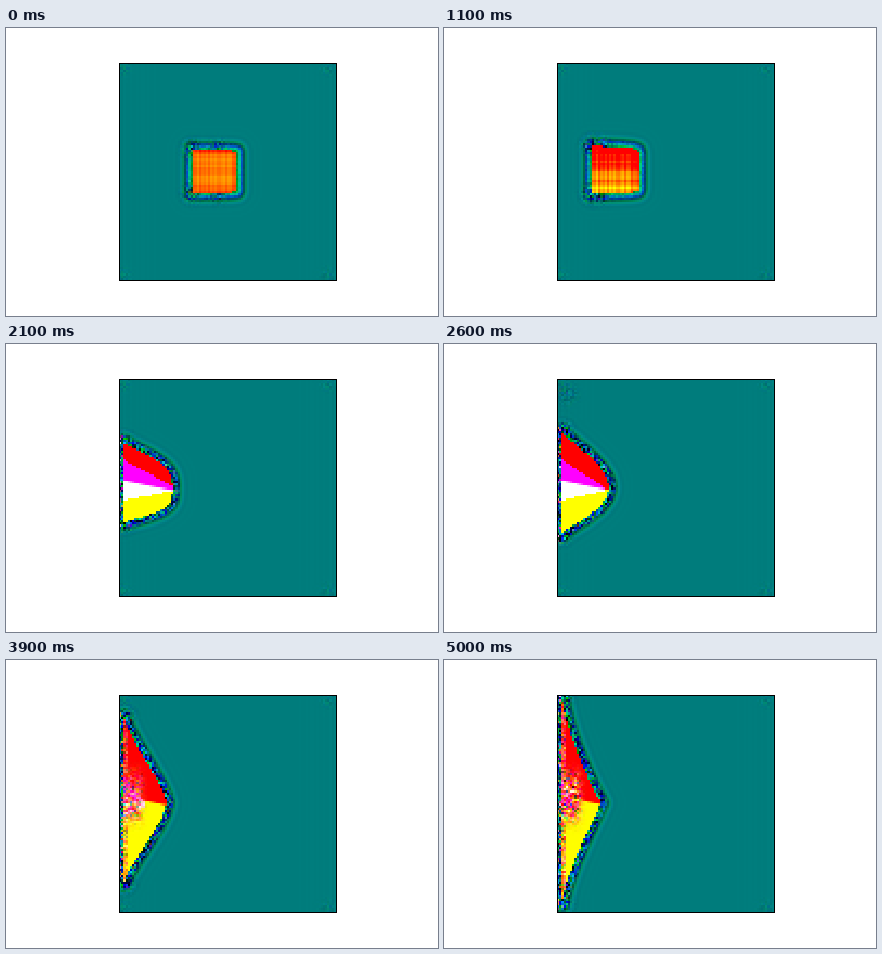
Write a matplotlib script that moves like this. It is 432x288 px and loops after 5.1 s.

```python
import numpy as np
import matplotlib.pyplot as plt
from matplotlib.animation import FuncAnimation
from matplotlib.path import Path

W, H, DPI = 432, 288, 72
FRAMES, STEP = 51, 100
N = 100                         # cells per side
X0, Y0, SIDE = 113, 35, 217     # field box, y downwards
WALL, TIP_Y = 118, 143
TAU = 2 * np.pi

centres = (np.arange(N) + 0.5) * SIDE / N
X, Y = np.meshgrid(X0 + centres, Y0 + centres)
CELLS = np.column_stack([X.ravel(), Y.ravel()])


def smooth(t, start, end):
    s = np.clip((t - start) / (end - start), 0, 1)
    return s * s * (3 - 2 * s)


def ramp(t, start):
    """Zero before start, then rising by one a second, with a soft knee."""
    return np.log1p(np.exp(4 * (t - start))) / 4


def spot(x, y, r):
    return np.exp(-((X - x) ** 2 + (Y - y) ** 2) / r ** 2)


def power(t):
    """Exponent of the right edge: boxy at first, a plain wedge at the end."""
    return 2.7 - 0.35 * t + 60 * np.exp(-t * t)


def outline(t):
    """The blob drifts left, hits the wall and spreads along it."""
    left = max(WALL, 186 - 35 * t)
    right = max(231 - 33 * t, 173 - 3.2 * t)
    top = max(122 - 23 * ramp(t, 1.1), 38)
    bottom = min(165 + 25 * ramp(t, 1.6), 243)

    v = np.sin(np.linspace(-np.pi / 2, np.pi / 2, 35))
    p = np.where(v < 0, power(t), power(max(t - 0.25, 0)))
    xs = left + (right - left) * (1 - np.abs(v) ** p) ** 1.35
    ys = TIP_Y + v * np.where(v < 0, TIP_Y - top, bottom - TIP_Y)
    corners = np.array([(x, y) for x in (left, xs[2]) for y in (top, bottom)])
    return np.column_stack([xs, ys]), corners


def distance(poly):
    """Distance of each cell to the outline, and the inside mask."""
    best = np.full(len(CELLS), np.inf)
    for a, b in zip(poly, np.roll(poly, -1, axis=0)):
        ab = b - a
        s = np.clip((CELLS - a) @ ab / max(ab @ ab, 1e-9), 0, 1)
        gap = CELLS - a - s[:, None] * ab
        best = np.minimum(best, (gap ** 2).sum(axis=1))
    inside = Path(poly).contains_points(CELLS)
    return np.sqrt(best).reshape(N, N), inside.reshape(N, N)


def background():
    rng = np.random.default_rng(9)
    img = np.zeros((N, N, 3))
    img[..., 1:] = 0.49
    near = sum(spot(x, y, 7) for x in (117, 322) for y in (40, 247))
    img[..., 1:] += 0.07 * near[..., None] * rng.uniform(-1, 1, (N, N, 2))
    rim = np.minimum(X - X0, X0 + SIDE - X)
    img[..., 1:] += (0.015 * np.exp(-rim / 9) * np.cos(TAU * rim / 6))[..., None]
    return img


BACK = background()
LINES = np.random.default_rng(4).uniform(-1, 1, (2, N))


def grid_lines(left, top, t):
    """Fine lines that travel with the blob."""
    cols = ((X - left) * N / SIDE).astype(int) % N
    rows = ((Y - top) * N / SIDE).astype(int) % N
    fade = 0.1 + 0.12 * smooth(t, 0, 1) - 0.22 * smooth(t, 1.5, 2.1)
    return fade * (LINES[0][cols] + LINES[1][rows])


def ring(img, d, corners, t, rng):
    rough = np.max([spot(x, y, 8) for x, y in corners], axis=0)
    clump = spot(123, 50, 9) * np.exp(-((t - 3.1) / 0.4) ** 2)
    near = np.exp(-(d / 9) ** 3)
    mix = (0.1 + 0.8 * smooth(t, 0.8, 2.6)) * np.exp(-(d / 6.5) ** 4)
    mix = np.clip(mix + 0.6 * rough + clump, 0, 1)
    r, g, b = rng.uniform(-1, 1, (3, N, N))

    wave = (1 - mix) * near * 0.36
    halo = 0.05 * np.exp(-(d / 12) ** 2) * np.cos(TAU * d / 6)
    img[..., 1] += wave * np.cos(TAU * (d - 2) / 8) + mix * (0.6 * g - 0.2) + halo
    img[..., 2] += wave * np.cos(TAU * (d - 4) / 8) + mix * (0.6 * b - 0.05) + halo / 2
    img[..., 0] += mix * np.where(X < WALL, r > 0.6, 0.4 * (r > 0.9))


def fill(d, left, top, t, rng):
    spread = smooth(t, 1.5, 2.1)
    line = 147 - 5 * spread + 0.2 * smooth(t, 0.5, 1.5) * (X - 145)
    green = 0.47 + (0.022 * min(t, 1.5) + 0.5 * spread) * (Y - line)
    green += grid_lines(left, top, t)
    green -= 0.4 * (1 - spread) * np.exp(-d / 2)

    # counterflow wedge: blue channel switched on next to the wall
    tip = np.interp(t, [1.5, 2.1, 5], [113, 168, 122])
    s = (X - WALL) / max(tip - WALL, 1)
    wedge = (s < 1) & (Y > 116 + 27 * s) & (Y < 156 - 9 * s) & (tip > WALL)

    r, g, b = rng.uniform(-1, 1, (3, N, N))
    g = (g + np.roll(g, 1, 1)) * 0.7
    core = np.exp(-((X - 124) / 13) ** 4 - ((Y - 137) / 25) ** 4)
    zone = smooth(t, 2.9, 4.4) * np.maximum(core, 0.6 * (X < 121))
    green = np.clip(green, 0, 1) * (1 - zone) + zone * (0.4 + 0.6 * g)
    blue = wedge * (1 - zone) + zone * (0.35 + 0.6 * b)
    red = 1 - zone * 0.8 * (r > 0.75)
    return np.stack([red, green, blue], axis=-1)


def field(i):
    t = i * STEP / 1000
    rng = np.random.default_rng(100 + i)
    edge, corners = outline(t)
    left, top = corners[0]
    d, inside = distance(np.vstack([corners[0], edge, corners[1]]))
    img = BACK.copy()
    ring(img, d, corners, t, rng)
    img[inside] = fill(d, left, top, t, rng)[inside]
    return np.clip(img, 0, 1)


fig = plt.figure(figsize=(W / DPI, H / DPI), dpi=DPI, facecolor="white")
ax = fig.add_axes([X0 / W, 1 - (Y0 + SIDE) / H, SIDE / W, SIDE / H])
ax.set_xticks([])
ax.set_yticks([])
for spine in ax.spines.values():
    spine.set_linewidth(1)
picture = ax.imshow(field(0), interpolation="nearest", aspect="auto")


def update(i):
    picture.set_data(field(i))
    return [picture]


anim = FuncAnimation(fig, update, frames=FRAMES, interval=STEP,
                     repeat=True, repeat_delay=0)
plt.show()
```
